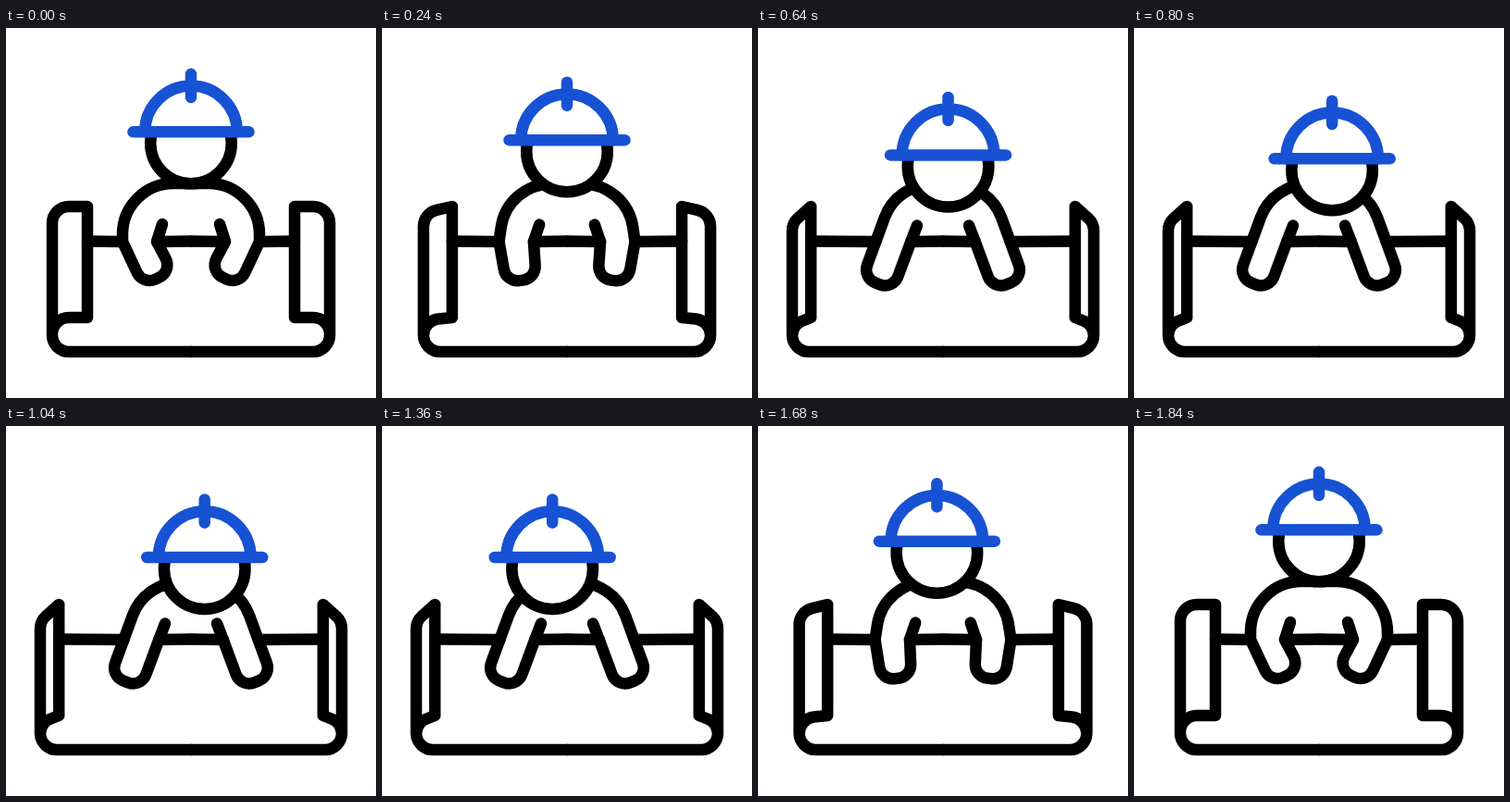
Write an HTML page with a canvas that moves like this. It is 400 by 400 pixels and loops after 2 s.

```html
<!DOCTYPE html>
<html lang="en">
<head>
<meta charset="utf-8">
<title>Worker with plan</title>
<style>
  html, body { margin: 0; width: 100%; height: 100%; overflow: hidden; background: #fff; }
  canvas { display: block; width: 100vw; height: 100vh; }
</style>
</head>
<body>
<canvas id="stage"></canvas>
<script>
  const LOOP = 2000, STEP = 40, SIZE = 400, MID = SIZE / 2;
  const INK = "#000", BLUE = "#1652d3";
  const canvas = document.getElementById("stage");
  const ctx = canvas.getContext("2d");

  const mix = (a, b, k) => a + (b - a) * k;

  // Eased 0 to 1 between two times
  function ramp(t, from, to) {
    const k = Math.min(1, Math.max(0, (t - from) / (to - from)));
    return k * k * (3 - 2 * k);
  }

  // Polyline through [x, y, corner radius]
  function line(...points) {
    ctx.beginPath();
    points.forEach(([x, y, r = 0], i) => {
      const next = points[i + 1];
      if (i && next && r) ctx.arcTo(x, y, next[0], next[1], r);
      else if (i) ctx.lineTo(x, y);
      else ctx.moveTo(x, y);
    });
    ctx.stroke();
  }

  function paper(open) {
    const top = 193, bottom = 350, fold = 313, r = 18;
    const side = mix(50, 37, open);
    const edge = mix(88, 57.2, open);
    line(
      [MID, bottom], [side, bottom, r], [side, fold + 8 * open, r],
      [edge, fold], [edge, top], [side, top + 18 * open, r], [side, fold + r]
    );
  }

  function arm(open) {
    const at = (x, y, x2, y2, r) => [mix(x, x2, open), mix(y, y2, open), r];
    const elbow = at(126, 231, 127.3, 231);
    const wrist = at(163, 231, 165.3, 231);
    line(
      [MID, 168 + open], at(126, 168, 150, 169, 55), elbow,
      at(148, 278, 113, 270, 15), at(180, 263, 146, 283, 15),
      wrist, at(169, 212, 172, 213.5)
    );
    line([mix(88, 57.2, open), 230.5], elbow);
    line(wrist, [MID, 230.5]);
  }

  function head(x, y) {
    const brim = 112.3;
    ctx.save();
    ctx.translate(MID + x, y);
    ctx.beginPath();
    ctx.arc(0, 124.5, 43.8, 0, Math.PI * 2);
    ctx.fill();
    ctx.stroke();
    ctx.strokeStyle = BLUE;
    ctx.beginPath();
    ctx.arc(0, brim, 49.8, Math.PI, 0);
    ctx.fill();
    ctx.stroke();
    line([-62.5, brim], [62.5, brim]);
    line([0, 49.8], [0, 75]);
    ctx.restore();
  }

  function draw(t) {
    const back = ramp(t, 1480, 1840);
    const open = ramp(t, 120, 400) - back;
    const lean = ramp(t, 480, 880);
    const turn = lean - 2 * ramp(t, 1000, 1360) + back;

    const w = canvas.width = innerWidth * devicePixelRatio;
    const h = canvas.height = innerHeight * devicePixelRatio;
    const scale = Math.min(w, h) / SIZE;
    ctx.setTransform(scale, 0, 0, scale, (w - SIZE * scale) / 2, (h - SIZE * scale) / 2);
    ctx.lineWidth = 12.5;
    ctx.lineCap = ctx.lineJoin = "round";
    ctx.strokeStyle = INK;
    ctx.fillStyle = "#fff";

    for (const flip of [1, -1]) {
      ctx.save();
      ctx.translate(MID, 0);
      ctx.scale(flip, 1);
      ctx.translate(-MID, 0);
      paper(open);
      arm(open);
      ctx.restore();
    }
    head(15.8 * turn, 22.6 * open + 7.1 * (lean - back));
  }

  const start = performance.now();
  function tick() {
    const t = (performance.now() - start) % LOOP;
    draw(Math.floor(t / STEP) * STEP);
    requestAnimationFrame(tick);
  }
  tick();
</script>
</body>
</html>
```
